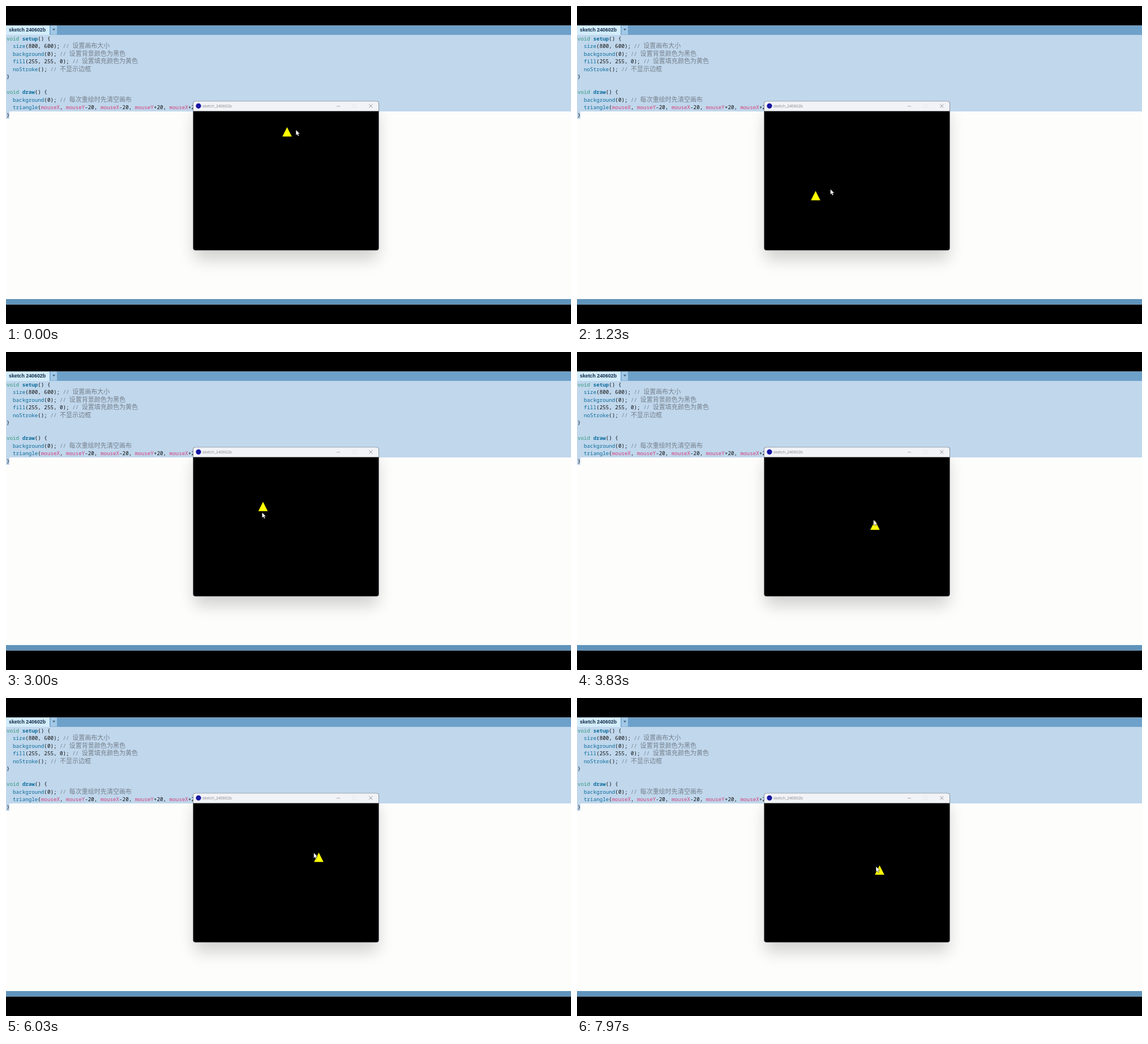
Recreate the animation shown at these times as an HTML page. Size 998 px wide and 561 px high, loop 8 s.

```html
<!DOCTYPE html>
<html lang="zh-CN">
<head>
<meta charset="utf-8">
<title>Sketch</title>
<style>
  html, body { margin: 0; width: 100%; height: 100%; overflow: hidden; background: #000; }
  svg { display: block; width: 100vw; height: 100vh; }
  text { white-space: pre; }
  .code { font: 9.22px "Noto Sans Mono", monospace; fill: #111; }
  .type { fill: #33997e; }
  .fn { fill: #0b6c9c; }
  .def { fill: #0b6c9c; font-weight: bold; }
  .var { fill: #d5407c; }
  .note { fill: #76818c; }
  .cjk { font: 300 11.06px "Noto Sans CJK SC", "Noto Sans CJK", sans-serif; }
  .tab { font: bold 8.8px "Liberation Sans", Arial, sans-serif; fill: #0c2a45; }
  .title { font: 6.9px "Noto Sans", sans-serif; fill: #8c8c90; }
</style>
</head>
<body>
<svg viewBox="0 0 998 561">
  <defs>
    <filter id="blur" x="-30%" y="-30%" width="160%" height="160%">
      <feGaussianBlur stdDeviation="14"/>
    </filter>
    <clipPath id="editor"><rect y="186" width="998" height="331"/></clipPath>
    <clipPath id="canvas"><rect x="331" y="185.5" width="327" height="245"/></clipPath>
  </defs>
  <rect width="998" height="561"/>
  <rect y="34.5" width="998" height="492" fill="#fdfdfc"/>
  <rect y="34.5" width="998" height="16.5" fill="#6ea1ca"/>
  <rect y="34.5" width="77" height="16.5" fill="#d3ecfb"/>
  <rect x="78.5" y="34.5" width="11.5" height="16" fill="#a3c8e6"/>
  <path d="M82 40h5l-2.5 3.6z" fill="#41698c"/>
  <text class="tab" x="5" y="45">sketch 240602b</text>
  <path d="M0 51H998V186H6V199H0Z" fill="#c0d7ec"/>
  <g id="code" class="code"></g>
  <rect y="517" width="998" height="9.5" fill="#6094bc"/>

  <g clip-path="url(#editor)">
    <rect x="332" y="190" width="325" height="258" rx="8" opacity=".17" filter="url(#blur)"/>
  </g>
  <rect x="330.5" y="168" width="328" height="263" rx="4"/>
  <path d="M330.5 185.5V172a4 4 0 0 1 4-4H654.5a4 4 0 0 1 4 4V185.5Z" fill="#f2f3f7"/>
  <rect x="330.5" y="168" width="328" height="263" rx="4" fill="none" stroke="#777e88" stroke-width=".6"/>
  <circle cx="340" cy="176.3" r="4.6" fill="#1717a3"/>
  <text class="title" x="347" y="178.7">sketch_240602b</text>
  <g fill="none" stroke-width=".8">
    <path d="M584 176.8h6" stroke="#9a9aa6"/>
    <rect x="612.5" y="173.5" width="6" height="6" rx="1" stroke="#e3e4e8"/>
    <path d="M641.3 173.3l6 6m0-6l-6 6" stroke="#77777c"/>
  </g>
  <g clip-path="url(#canvas)">
    <path id="tri" d="M0-8.3L8.3 8.2H-8.3Z" fill="#ff0"/>
    <path id="cursor" d="M0 0V9.7L2.2 7.7 3.8 11.2 5.5 10.4 4 7H7Z" fill="#fff" stroke="#000" stroke-width=".5"/>
  </g>
</svg>
<script>
const $ = id => document.getElementById(id);
const NS = 'http://www.w3.org/2000/svg';
const COL = 5.53, ROW = 13.45;

const source = `void setup() {
  size(800, 600); // 设置画布大小
  background(0); // 设置背景颜色为黑色
  fill(255, 255, 0); // 设置填充颜色为黄色
  noStroke(); // 不显示边框
}

void draw() {
  background(0); // 每次重绘时先清空画布
  triangle(mouseX, mouseY-20, mouseX-20, mouseY+20, mouseX+20, mouseY+20);
}`;

const styles = [
  [/^void/, 'type'], [/^(setup|draw)/, 'def'], [/^mouse/, 'var'],
  [/^[a-z]/i, 'fn'], [/^\/\//, 'note'], [/^[^\x00-\x7f]/, 'note cjk']
];

function addText(str, row, col) {
  const el = document.createElementNS(NS, 'text');
  const style = styles.find(([re]) => re.test(str));
  el.setAttribute('x', 1 + col * COL);
  el.setAttribute('y', 61 + row * ROW);
  if (style) el.setAttribute('class', style[1]);
  el.textContent = str;
  $('code').append(el);
}

source.split('\n').forEach((line, row) => {
  for (const m of line.matchAll(/[a-z]+|\/\/|[^\x00-\x7f]+|[^a-z\s\/]+/gi)) addText(m[0], row, m.index);
});

// The pointer glides through some points and rests at others; time in ticks of 1/30 s.
const pass = (n, x, y, vx, vy) => ({ from: n, to: n, pos: [x, y], vel: [vx, vy] });
const rest = (from, to, x, y) => ({ from, to, pos: [x, y], vel: [0, 0] });

const route = [
  pass(0, 496.5, 222, 17.5, -4.5),
  rest(25, 26, 375, 350),
  pass(37, 421.5, 334.5, 29, -12),
  rest(48, 56, 510, 270),
  rest(70, 75, 465, 240),
  pass(90, 454, 272.5, -2, 11.5),
  rest(96, 102, 449, 305),
  rest(112, 112, 530, 320),
  pass(126, 448, 253, -12, 13),
  rest(131, 138, 406, 298),
  rest(145, 150, 385.5, 324.5),
  rest(156, 163, 405, 310),
  pass(181, 552.5, 281, -9.5, -9.5),
  rest(186, 188, 525, 262),
  rest(212, 213, 367, 352),
  pass(220, 533.5, 382, 17.5, -1),
  rest(233, 233, 621, 352),
  pass(239, 534.5, 303.5, -6.5, -7),
  rest(246, 246, 505, 280)
];

// Cubic Hermite glide from one stop to the next.
function pointer(n) {
  const i = route.findIndex(r => r.from > n);
  const a = route[i - 1], b = route[i];
  const d = b.from - a.to, u = Math.max(0, (n - a.to) / d), v = 1 - u;
  return a.pos.map((p, k) =>
    v * v * ((1 + 2 * u) * p + u * d * a.vel[k]) +
    u * u * ((1 + 2 * v) * b.pos[k] - v * d * b.vel[k]));
}

const place = (id, p) => $(id).setAttribute('transform', `translate(${p})`);

// The triangle trails the pointer by one tick.
function draw(ms) {
  const n = Math.min(239, Math.floor((ms % 8000 + 4) * 0.03));
  place('tri', pointer(n));
  place('cursor', pointer(n + 1));
}

const start = performance.now();
function loop() {
  draw(performance.now() - start);
  requestAnimationFrame(loop);
}
loop();
</script>
</body>
</html>
```
